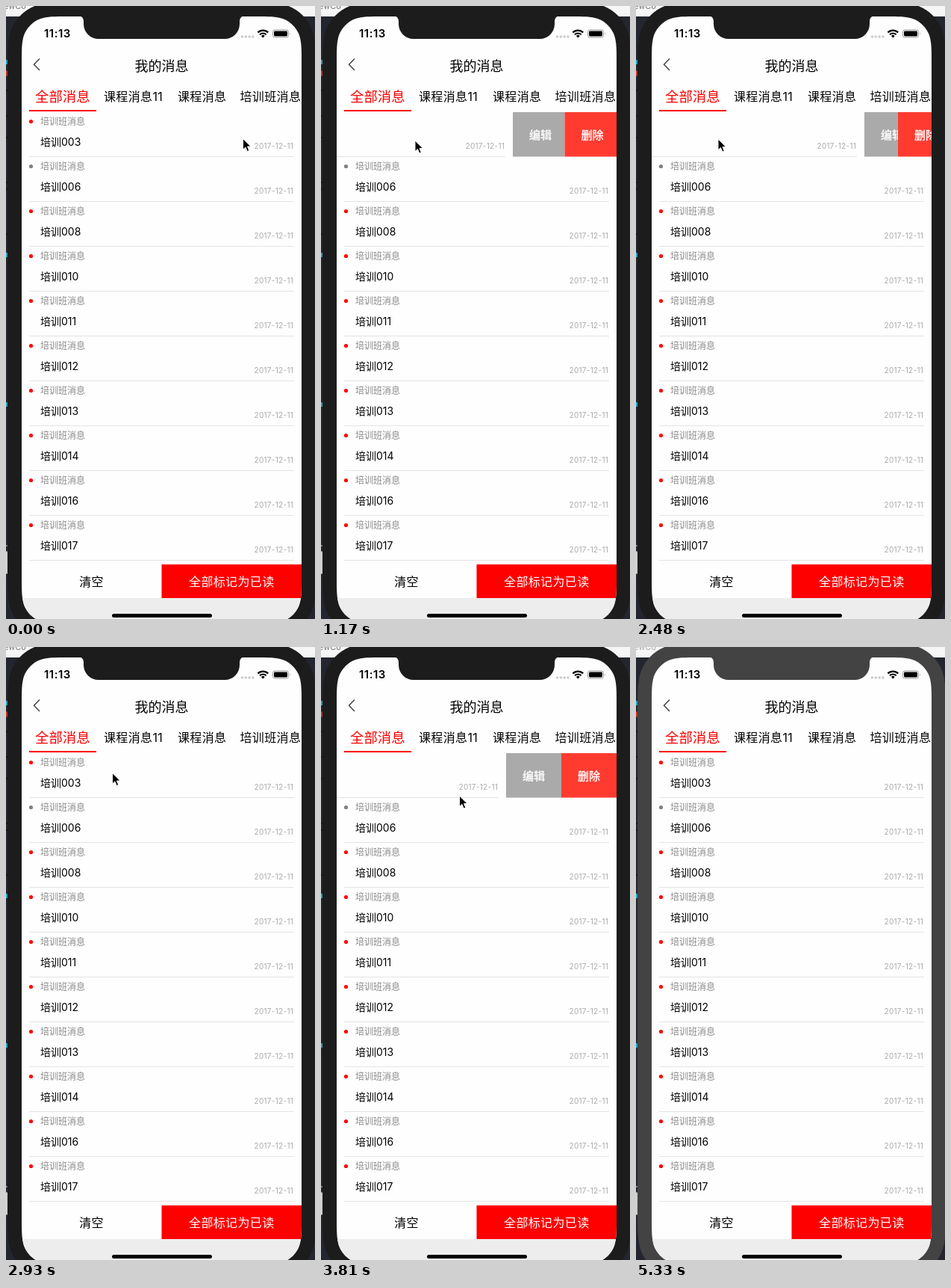
An HTML page that plays this animation: 414x820 px, repeating every 5.43 s.

```html
<!DOCTYPE html>
<html lang="zh-CN">
<head>
<meta charset="utf-8">
<title>消息列表</title>
<style>
html, body { margin: 0; width: 100%; height: 100%; overflow: hidden; background: #23262e; }
svg { display: block; width: 414px; height: 820px; font-family: Inter, "Noto Sans CJK SC", "Noto Sans CJK", sans-serif; }
.mid { text-anchor: middle; }
.tab { font-size: 16px; letter-spacing: .35px; }
.kind { font-size: 12px; fill: #888; }
.name { font-size: 14px; }
.date { font-size: 10px; fill: #aaa; letter-spacing: .3px; }
.act { font-size: 15px; fill: #fff; stroke: #fff; stroke-width: .4px; }
.shell { fill: #1c1c1c; }
.idle .shell { fill: #434343; }
.idle #behind text { fill: #aaa; }
</style>
</head>
<body>
<svg id="stage" viewBox="0 0 414 820">
  <defs>
    <clipPath id="screen"><path id="glass"/></clipPath>
    <clipPath id="slot"><rect x="21" y="142" width="375" height="60"/></clipPath>
    <clipPath id="grayClip"><rect id="grayBox" y="142" height="59.5"/></clipPath>
    <clipPath id="redClip"><rect id="redBox" y="142" height="59.5"/></clipPath>
  </defs>

  <g id="behind">
    <rect width="414" height="820" fill="#23262e"/>
    <rect width="414" height="14" fill="#f6f6f6"/>
    <text x="-3" y="4" font-size="11" fill="#777">ewCo</text>
    <path d="M0 113h3M0 147h3M0 176h3M0 236h3M0 245h3M0 305h3" stroke="#000"/>
    <path d="M0 75h2M0 333h2M0 533h2" stroke="#18a5c0" stroke-width="6"/>
    <path d="M0 90h2" stroke="#c33025" stroke-width="7"/>
    <path d="M0 722h2M0 730v29h2v-29z" stroke="#ccc" fill="#ccc"/>
  </g>
  <path id="body" class="shell"/>

  <g clip-path="url(#screen)">
    <rect x="21" y="14" width="375" height="812" fill="#fefefe"/>

    <text x="51" y="42" font-size="15" font-weight="600" letter-spacing=".5">11:13</text>
    <g fill="#ccc">
      <circle cx="316.5" cy="41" r="1.8"/><circle cx="321.3" cy="41" r="1.8"/>
      <circle cx="326.1" cy="41" r="1.8"/><circle cx="330.9" cy="41" r="1.8"/>
    </g>
    <g fill="none" stroke="#000" stroke-width="2.2">
      <path d="M337.4 35.4a9.8 9.8 0 0 1 13.8 0"/>
      <path d="M340 38.3a6 6 0 0 1 8.6 0"/>
    </g>
    <path d="M344.3 42.6l-2.4-2.6a3.4 3.4 0 0 1 4.8 0z"/>
    <rect x="357.5" y="32" width="21" height="10" rx="2.6" fill="none" stroke="#999"/>
    <rect x="359" y="33.5" width="18" height="7" rx="1.4"/>
    <path d="M380 35.2q1.6 1.8 0 3.6z" fill="#999"/>

    <path d="M45 70.5l-7.5 7.7 7.5 7.7" fill="none" stroke="#444" stroke-width="1.5"/>
    <text class="mid" x="208.5" y="86.5" font-size="18">我的消息</text>
    <text x="39" y="127.5" font-size="18.4" fill="#f00">全部消息</text>
    <text class="tab" x="131" y="127">课程消息11</text>
    <text class="tab" x="230" y="127">课程消息</text>
    <text class="tab" x="313.5" y="127">培训班消息</text>
    <rect x="31" y="139" width="90" height="2" fill="#f00"/>

    <g id="list"></g>
    <g clip-path="url(#slot)">
      <g id="swipe"></g>
      <g clip-path="url(#grayClip)">
        <rect x="21" y="142" width="375" height="60" fill="#aaa"/>
        <text class="act" id="edit" y="177.5">编辑</text>
      </g>
      <g clip-path="url(#redClip)">
        <rect x="21" y="142" width="375" height="60" fill="#ff3b30"/>
        <text class="act" id="del" y="177.5">删除</text>
      </g>
    </g>

    <rect x="21" y="792" width="375" height="34" fill="#ededed"/>
    <rect x="208.5" y="747" width="187.5" height="45" fill="#f00"/>
    <text class="mid tab" x="114.5" y="775.5">清空</text>
    <text class="mid tab" x="302.3" y="775.5" fill="#fff">全部标记为已读</text>
    <rect x="142" y="813" width="134" height="5" rx="2.5"/>
  </g>
  <path class="shell" d="M97 13a7 7 0 0 1 7 7v4a20 20 0 0 0 20 20H293a20 20 0 0 0 20-20v-4a7 7 0 0 1 7-7z"/>
  <path id="cursor" d="M0 0V14.6L3.4 11.4 5.8 17 8.3 15.9 6 10.5H10.5Z" stroke="#fff" stroke-width="1" stroke-linejoin="round"/>
</svg>
<script>
const LOOP = 5430, STEP = 146.2, OPEN = 148;
const $ = id => document.getElementById(id);

// Rectangle with smooth, continuous corners
function smoothRect(x, y, w, h, r) {
  const half = [[0, 1.5287], [0, 1.0885], [0, .8684], [.0749, .6315], [.1691, .3728]];
  const corner = [...half, ...half.map(([a, b]) => [b, a]).reverse()];
  const run = (fx, fy, back) => {
    const pts = corner.map(([a, b]) =>
      [fx ? x + w - a * r : x + a * r, fy ? y + h - b * r : y + b * r].join(' '));
    if (back) pts.reverse();
    return `${pts[0]}C${pts.slice(1).join(' ')}`;
  };
  return `M${run(0, 0)}L${run(1, 0, true)}L${run(1, 1)}L${run(0, 1, true)}Z`;
}
$('glass').setAttribute('d', smoothRect(21, 14, 375, 812, 40));
$('body').setAttribute('d', smoothRect(2, -5, 413, 850, 60));

const row = (num, y, dot) => `
  <circle cx="33.5" cy="${y + 12.5}" r="2.6" fill="${dot}"/>
  <text class="kind" x="46" y="${y + 17}">培训班消息</text>
  <text class="name" x="46" y="${y + 45}">培训${num}</text>
  <text class="date" x="332.5" y="${y + 49}">2017-12-11</text>
  <path d="M31 ${y + 59.5}H386" stroke="#e4e4e4"/>`;

const nums = ['003', '006', '008', '010', '011', '012', '013', '014', '016', '017'];
const rows = nums.map((n, i) => row(n, 142 + 60 * i, i === 1 ? '#808080' : '#f00'));
$('swipe').innerHTML = rows[0];
$('list').innerHTML = rows.slice(1).join('');

// Keys: [step, ...values], linear in between
const slide = [[0, 0], [2, 0], [4, 40], [7, 126], [9, 152], [10, OPEN],
  [16, OPEN], [17, 90], [18, 12], [19, 0], [22, 0], [24, 120], [25, OPEN],
  [28, OPEN], [29, 95], [30, 30], [31, 5], [32, 0]];
const path = [[0, 317.5, 177.5], [1, 312, 177.5], [4, 234.5, 177.5], [7, 148, 179],
  [9, 104, 181], [14, 100.5, 181.5], [17, 110, 178], [20, 142.5, 168.5],
  [22, 300, 174], [25, 160, 184], [26, 185.5, 199], [28, 225, 240],
  [31, 392.5, 738], [32, 391, 808]];

function at(keys, k) {
  const i = keys.findIndex(key => key[0] > k);
  if (i < 0) return keys[keys.length - 1].slice(1);
  const a = keys[i - 1], b = keys[i], p = (k - a[0]) / (b[0] - a[0]);
  return a.slice(1).map((v, j) => v + (b[j + 1] - v) * p);
}

function button(box, label, x, w) {
  box.setAttribute('x', x);
  box.setAttribute('width', w);
  label.setAttribute('x', x + 22);
}

function draw(now) {
  // The picture advances in even steps
  const k = Math.floor((now % LOOP + 8) / STEP);
  const off = Math.round(at(slide, k)[0]);
  const [x, y] = at(path, k);
  $('swipe').setAttribute('transform', `translate(${-off})`);
  button($('grayBox'), $('edit'), 396 - off, off / 2);
  button($('redBox'), $('del'), 396 - off / 2, off / 2);
  $('cursor').setAttribute('transform', `translate(${x} ${y})`);
  $('cursor').style.display = k > 32 ? 'none' : '';
  $('stage').classList.toggle('idle', k > 33);
}

const start = performance.now();
function tick() {
  draw(performance.now() - start);
  requestAnimationFrame(tick);
}
tick();
</script>
</body>
</html>
```
